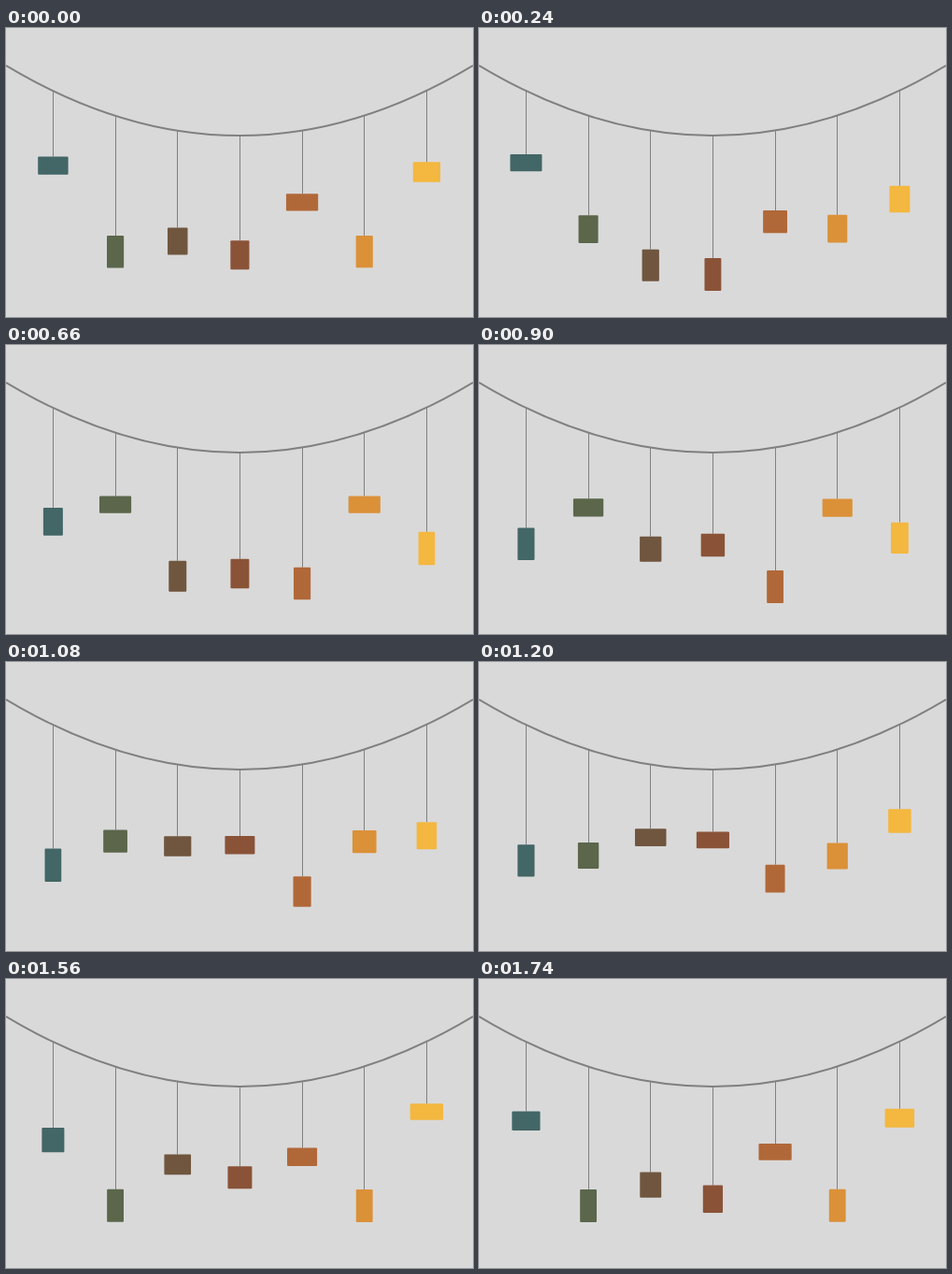
Write an HTML page that moves like this. It is 500 by 309 pixels and loops after 1.8 s.

```html
<!DOCTYPE html>
<html lang="en">
<head>
<meta charset="utf-8">
<title>Hanging blocks</title>
<style>
  html, body { margin: 0; width: 100%; height: 100%; overflow: hidden; background: #d9d9d9; }
  svg { display: block; width: 100%; height: 100%; }
  path, line { fill: none; stroke: #808080; }
</style>
</head>
<body>
<svg id="stage" viewBox="0 0 500 309">
  <path d="M0 40Q250 190 500 40" stroke-width="2"/>
</svg>
<script>
const LOOP = 1800, STEP = 60;
const SIDE = 25, LENGTH = 99.5, SWING = 100 / 3;

// [colour, phase in degrees at the start of the loop]
const blocks = [
  ['#436666', 150.8],
  ['#5b664b', 29.8],
  ['#70563f', -82.5],
  ['#8a5338', -67.5],
  ['#b16838', -163],
  ['#db9138', 30.5],
  ['#f4b73f', -134]
].map(([color, phase], i) => {
  const x = 50 + i * 200 / 3;
  const y = 115 - 75 * ((x - 250) / 250) ** 2;
  const lineX = Math.round(x) + 0.5;
  const string = add('line', { x1: lineX, x2: lineX, y1: y });
  const box = add('rect', { fill: color, rx: 1 });
  return { x: x + 0.4, y, phase, string, box };
});

function set(el, attrs) {
  for (const name in attrs) el.setAttribute(name, attrs[name]);
}

function add(tag, attrs) {
  const el = document.createElementNS('http://www.w3.org/2000/svg', tag);
  set(el, attrs);
  return document.getElementById('stage').appendChild(el);
}

function draw(now) {
  const time = Math.floor((now % LOOP) / STEP) * STEP;
  for (const { x, y, phase, string, box } of blocks) {
    const s = Math.cos(2 * Math.PI * (time / LOOP + phase / 360));
    const top = y + LENGTH + SWING * s;
    // The area stays constant while height / width runs from 1/2 to 2.
    const stretch = Math.sqrt(1.25 + 0.75 * s);
    const width = SIDE / stretch, height = SIDE * stretch;
    set(string, { y2: top });
    set(box, { x: x - width / 2, y: top, width, height });
  }
}

const start = performance.now();
function tick() {
  draw(performance.now() - start);
  requestAnimationFrame(tick);
}
tick();
</script>
</body>
</html>
```
